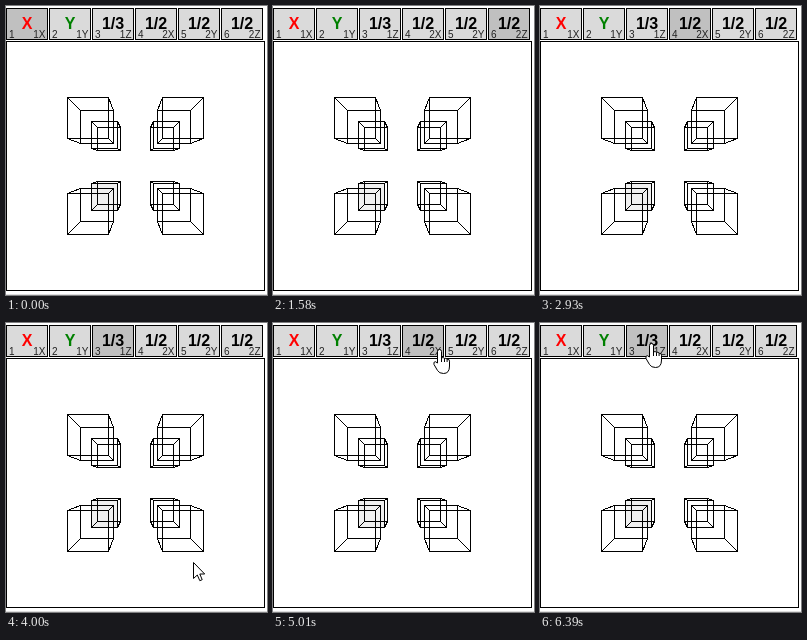
Recreate the animation shown at these times as an HTML page. Size 261 px wide and 289 px high, loop 6.55 s.

```html
<!DOCTYPE html>
<html lang="en">
<head>
<meta charset="utf-8">
<title>Cube axis selector</title>
<style>
  html, body { margin: 0; width: 100%; height: 100%; overflow: hidden; background: #fff; }
  svg { display: block; }
  text { font-family: "Liberation Sans", Arial, sans-serif; }
  .label { font-size: 16px; font-weight: bold; text-anchor: middle; }
  .hint { font-size: 10px; fill: #222; }
  .end { text-anchor: end; }
  .crisp { shape-rendering: crispEdges; stroke: #000; fill: none; }
  .cursor { fill: #fff; stroke: #000; stroke-linejoin: round; }
</style>
</head>
<body>
<svg id="stage" width="261" height="289" viewBox="0 0 261 289">
  <rect class="crisp" x=".5" y="35.5" width="258" height="249"/>
  <path d="M0 288.5H261" stroke="#dcdcdc"/>
  <rect x="85" y="177" width="27" height="27" fill="#f0f0f0"/>
  <path id="cubes" class="crisp"/>
  <g id="buttons"></g>
  <circle id="click" r="15" fill="#ff0" fill-opacity=".47"/>
  <g id="pointer" class="cursor">
    <path id="arrow" d="M.5 .5V16.5L4.3 13L6.8 18.7L9.2 17.7L6.8 12H11.7Z"/>
    <path id="hand" d="M4.5 14V2.5a2 2 0 0 1 4 0V9q1.700-1.200 3 .4 1.600-.8 2.600 .8 2.400-.4 2.400 2V17q0 7.500-6 7.500Q6.300 24.500 4.500 21.500L1 15.500Q.2 12.700 2.400 12.700Z M8.500 9v4M11.500 9.400v3.600M14.100 10.200v2.800"/>
  </g>
</svg>
<script>
const LOOP = 6550;
const NORMAL = '#dadada', ACTIVE = '#c0c0c0';
const byId = id => document.getElementById(id);

function add(parent, tag, attributes, content = '') {
  const node = document.createElementNS('http://www.w3.org/2000/svg', tag);
  for (const name in attributes) node.setAttribute(name, attributes[name]);
  node.textContent = content;
  return parent.appendChild(node);
}

// Buttons: main label, number at the left, axis name at the right
const labels = ['X', 'Y', '1/3', '1/2', '1/2', '1/2'];
const axes = ['1X', '1Y', '1Z', '2X', '2Y', '2Z'];
const colors = ['red', 'green'];
const buttons = labels.map((label, i) => {
  const g = add(byId('buttons'), 'g', { transform: `translate(${i * 43} 0)` });
  const face = add(g, 'rect', { class: 'crisp', x: .5, y: 2.5, width: 41, height: 31 });
  add(g, 'text', { class: 'label', x: 21, y: 23, fill: colors[i] || '#000' }, label);
  add(g, 'text', { class: 'hint', x: 3, y: 32 }, i + 1);
  add(g, 'text', { class: 'hint end', x: 39.5, y: 32 }, axes[i]);
  return face;
});

// Eight wireframe cubes in one-point perspective around the centre
const CENTER = [129.5, 160], OUTER = 68.3, INNER = 27.3;
function cube(sx, sy, near, far) {
  const point = (x, y, scale) => [CENTER[0] + sx * x * scale, CENTER[1] + sy * y * scale]
    .map(v => Math.floor(v) + .5).join(' ');
  const corners = [[OUTER, OUTER], [INNER, OUTER], [INNER, INNER], [OUTER, INNER]];
  const face = scale => 'M' + corners.map(([x, y]) => point(x, y, scale)).join('L') + 'Z';
  const edges = corners.map(([x, y]) => `M${point(x, y, near)}L${point(x, y, far)}`).join('');
  return face(near) + face(far) + edges;
}
let wires = '';
for (const sx of [-1, 1])
  for (const sy of [-1, 1])
    wires += cube(sx, sy, 1, .81) + cube(sx, sy, .645, .56);
byId('cubes').setAttribute('d', wires);

// Start time followed by the highlighted buttons (selected and hovered)
const highlights = [
  [0, 1], [230, 2], [620, 3], [990, 4], [1310, 5], [1580, 6], [1910, 5], [2230, 4],
  [2600, 3], [2930, 4], [3390, 3], [4440, 3, 4], [4770, 4], [5130, 4, 5], [5280, 5],
  [5980, 3, 5], [6300, 3]
];
// Time, x and y of the pointer's hot spot
const moves = [
  [4000, 187, 239], [4040, 187, 239], [4490, 157, 21], [4970, 157, 21], [5010, 166, 27],
  [5130, 180, 31], [5280, 196, 22], [5700, 196, 22], [6110, 111, 21], [LOOP, 111, 21]
];
const clicks = [[4770, 4970], [5460, 5610], [6300, 6390]];

function pointerAt(t) {
  const next = moves.findIndex(move => move[0] > t);
  const [t0, x0, y0] = moves[next - 1], [t1, x1, y1] = moves[next];
  const p = (t - t0) / (t1 - t0), k = p * p * (3 - 2 * p);
  return [Math.round(x0 + (x1 - x0) * k), Math.round(y0 + (y1 - y0) * k)];
}

function show(id, visible) {
  byId(id).style.display = visible ? '' : 'none';
}

function draw(now) {
  const t = now % LOOP;
  const [, ...lit] = highlights.findLast(entry => entry[0] <= t);
  buttons.forEach((face, i) => { face.style.fill = lit.includes(i + 1) ? ACTIVE : NORMAL; });

  const visible = t >= moves[0][0];
  show('pointer', visible);
  show('click', clicks.some(([from, to]) => t >= from && t < to));
  if (visible) {
    const [x, y] = pointerAt(t), hand = y < 34;
    show('hand', hand);
    show('arrow', !hand);
    byId('pointer').setAttribute('transform', `translate(${hand ? x - 6 : x} ${hand ? y - 1 : y})`);
    byId('click').setAttribute('cx', x);
    byId('click').setAttribute('cy', y);
  }
}

const start = performance.now();
function tick() {
  draw(performance.now() - start);
  requestAnimationFrame(tick);
}
tick();
</script>
</body>
</html>
```
